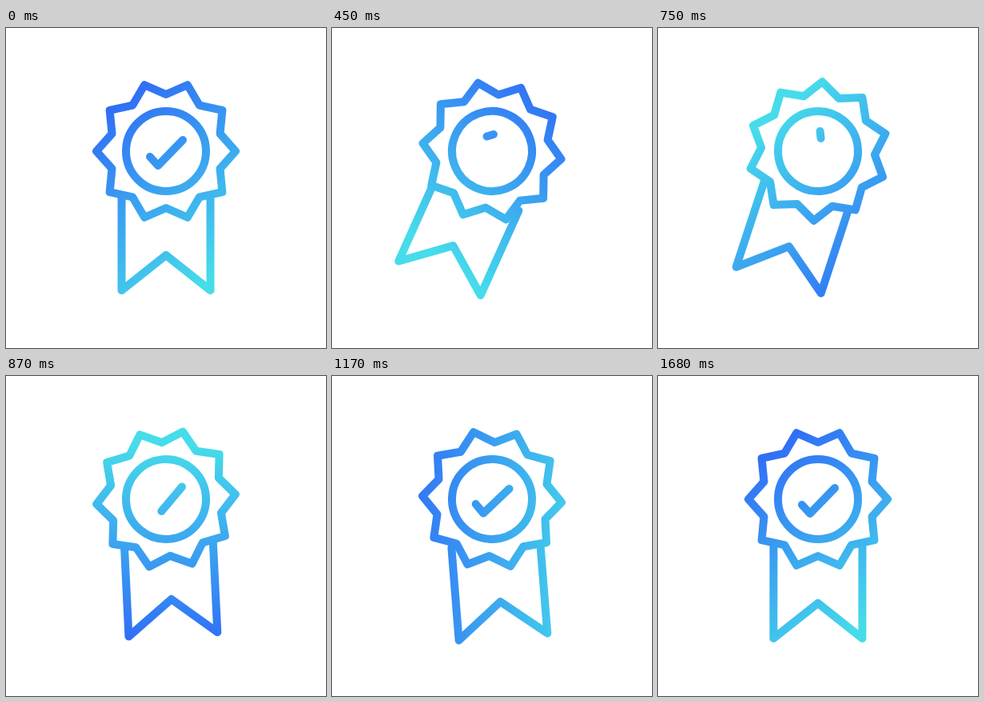
An HTML page with a canvas for the animation above (1710 ms loop, 400 px wide and 400 px high).

```html
<!DOCTYPE html>
<html>
<head>
<meta charset="utf-8">
<style>
html, body { margin: 0; width: 100%; height: 100%; overflow: hidden; background: #fff; }
canvas { display: block; width: 400px; height: 400px; }
</style>
</head>
<body>
<canvas id="stage" width="400" height="400"></canvas>
<script>
const ctx = document.getElementById('stage').getContext('2d');
const LOOP = 1710, CX = 200, CY = 154, RAD = Math.PI / 180;

// Keys are [time in ms, degrees]; the ribbon's anchor swings while the ribbon tilts
const SPIN = [[157, 0], [945, 365], [1410, 360]];
const SWING = [[94, 0], [615, 29], [992, -13], [1385, 6.2], [1695, 0]];
const TILT = [[110, 0], [615, 30], [992, -13.3], [1385, 6.9], [1695, 0]];
const HANG = 100; // distance from the badge centre to the ribbon's anchor
const CHECK = [[-20, 7], [-10, 18], [21, -14]];
const CHECK_LEN = Math.hypot(10, 11) + Math.hypot(31, 32);

const mix = (a, b, p) => a + (b - a) * p;

function ease(t, from, to) {
  const s = Math.min(1, Math.max(0, (t - from) / (to - from)));
  return s * s * (3 - 2 * s);
}

// Returns the two angles around time t and the eased progress between them
function segment(keys, t) {
  let i = 0;
  while (i < keys.length - 2 && t >= keys[i + 1][0]) i++;
  const [t0, a] = keys[i], [t1, b] = keys[i + 1];
  return [a * RAD, b * RAD, ease(t, t0, t1)];
}

function trace(points, closed) {
  ctx.beginPath();
  points.forEach(([x, y]) => ctx.lineTo(x, y));
  if (closed) ctx.closePath();
}

const star = Array.from({ length: 20 }, (_, i) => {
  const r = i % 2 ? 71 : 87, a = i * 18 * RAD;
  return [r * Math.cos(a), r * Math.sin(a)];
});

// The gradient turns around its own centre, whatever the parts do
function makeInk(t) {
  const a = (53 + 360 * ease(t, 0, 1520)) * RAD;
  const x = Math.cos(a), y = Math.sin(a);
  const ink = ctx.createLinearGradient(212 - 155 * x, 202 - 155 * y, 212 + 115 * x, 202 + 115 * y);
  ink.addColorStop(0, '#2e63f7');
  ink.addColorStop(1, '#46dcea');
  return ink;
}

// Strokes the current path in stage space so that the gradient stays put
function strokeInk(ink) {
  ctx.save();
  ctx.resetTransform();
  ctx.strokeStyle = ink;
  ctx.stroke();
  ctx.restore();
}

function drawRibbon(t, ink) {
  const [a, b, p] = segment(SWING, t), tilt = mix(...segment(TILT, t));
  const tuck = 6 * Math.max(0, tilt / (30 * RAD)) ** 2;
  ctx.save();
  // The anchor travels straight between its key places
  ctx.translate(CX - HANG * mix(Math.sin(a), Math.sin(b), p),
                CY + HANG * mix(Math.cos(a), Math.cos(b), p));
  ctx.rotate(tilt);
  ctx.translate(0, -HANG);
  trace([[tuck - 55.5, 58], [-55.5, 174], [0, 130], [55.5, 174], [tuck + 55.5, 58]]);
  strokeInk(ink);
  ctx.restore();
}

function drawBadge(t, ink) {
  ctx.save();
  ctx.translate(CX, CY);
  ctx.rotate(mix(...segment(SPIN, t)));

  trace(star, true);
  ctx.fillStyle = '#fff';
  ctx.fill();
  strokeInk(ink);

  ctx.beginPath();
  ctx.arc(0, 0, 50, 0, 2 * Math.PI);
  strokeInk(ink);

  // The tick is erased from its tip, then drawn again from its tip
  const back = t > 600;
  const shown = CHECK_LEN * (back ? ease(t, 670, 997) : 1 - ease(t, 80, 570));
  if (shown > 0.01) {
    trace(CHECK);
    ctx.setLineDash([shown, 200]);
    ctx.lineDashOffset = back ? shown - CHECK_LEN : 0;
    strokeInk(ink);
  }
  ctx.restore();
}

function draw(now) {
  const t = now % LOOP;
  ctx.fillStyle = '#fff';
  ctx.fillRect(0, 0, 400, 400);
  ctx.lineWidth = 10;
  ctx.lineCap = ctx.lineJoin = 'round';
  const ink = makeInk(t);
  drawRibbon(t, ink);
  drawBadge(t, ink);
}

const start = performance.now();
function tick() {
  draw(performance.now() - start);
  requestAnimationFrame(tick);
}
tick();
</script>
</body>
</html>
```
